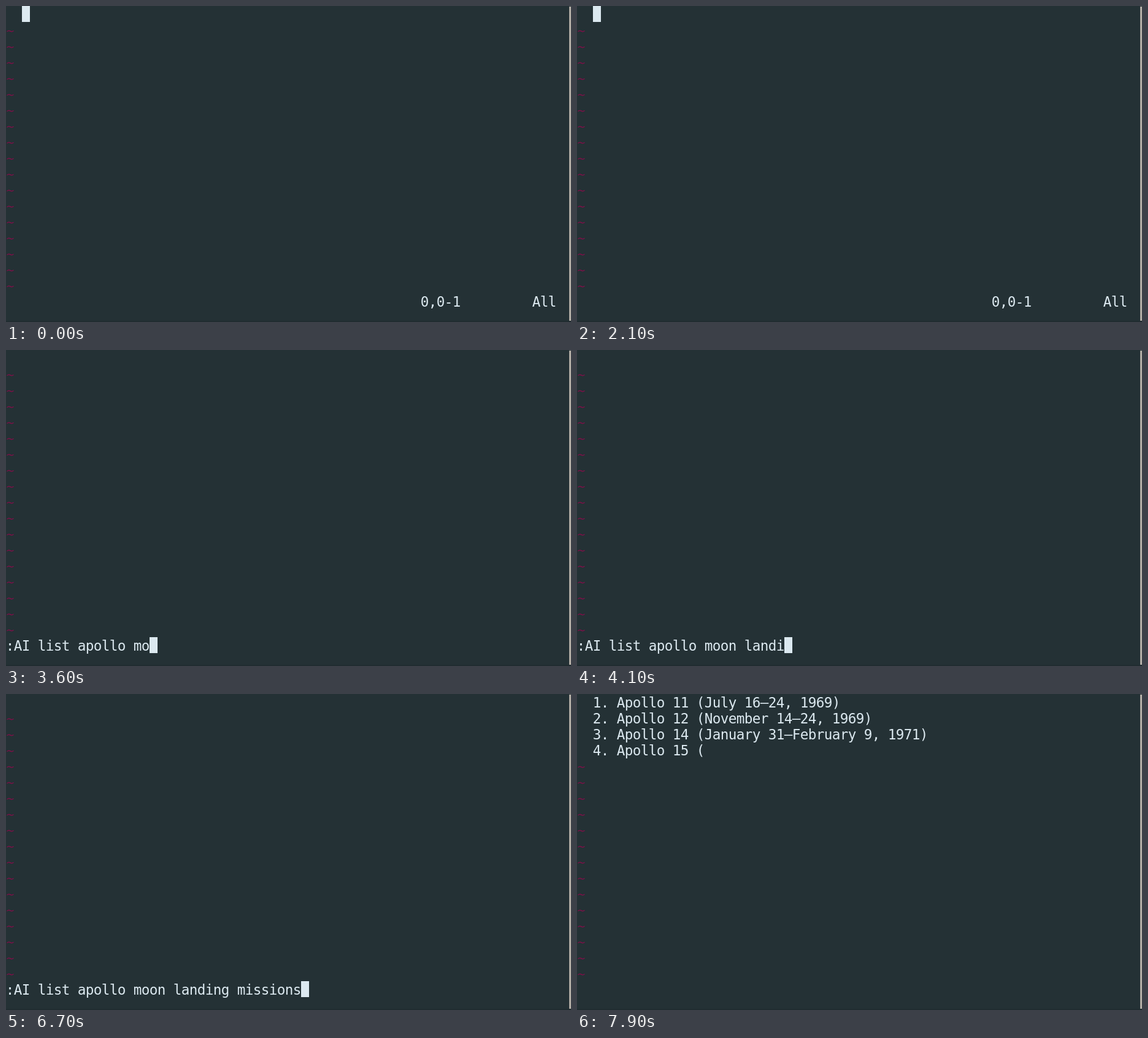
Animation of 921 by 515 pixels, one loop 8000 ms. Source, as an HTML page:

```html
<!DOCTYPE html>
<html lang="en">
<head>
<meta charset="utf-8">
<title>Editor session</title>
<style>
  html, body { margin: 0; width: 100%; height: 100%; overflow: hidden; background: #243135; }
  svg { display: block; width: 921px; height: 515px; }
  text { font: 22.6px "DejaVu Sans Mono", monospace; fill: #dce9f0; text-anchor: middle; }
  .tilde { fill: none; stroke: #7c1148; stroke-width: 1.5; }
</style>
</head>
<body>
<svg id="screen" viewBox="0 0 921 515">
  <rect width="921" height="515" fill="#243135"/>
  <rect y="513" width="921" height="2" fill="#202c30"/>
  <rect x="918" y="1" width="3" height="512" fill="#b3aea6"/>
</svg>
<script>
const CELL = 13, ROW = 26, LOOP = 8000, LAST = 18;
const command = ':AI list apollo moon landing missions';
const reply = [
  '1. Apollo 11 (July 16–24, 1969)',
  '2. Apollo 12 (November 14–24, 1969)',
  '3. Apollo 14 (January 31–February 9, 1971)',
  '4. Apollo 15 ('
];
// [time, characters typed]
const typing = [[2900, 1], [3600, 18], [3700, 20], [4100, 26], [4600, 37]];
// [time, cursor visible]
const blinks = [[0, 1], [300, 0], [900, 1], [1500, 0], [2100, 1], [2700, 0],
  [2900, 1], [5200, 0], [5800, 1], [6400, 0], [6700, 1], [7000, 0]];

const screen = document.getElementById('screen');

function add(tag, attrs) {
  const el = document.createElementNS('http://www.w3.org/2000/svg', tag);
  for (const key in attrs) el.setAttribute(key, attrs[key]);
  return screen.appendChild(el);
}

// One glyph per terminal cell.
function addText(str, col, row) {
  const x = [...str].map((_, i) => (col + i + 0.5) * CELL).join(' ');
  const el = add('text', { x, y: row * ROW + 22 });
  el.textContent = str;
  return el;
}

function setText(el, str) {
  if (el.textContent !== str) el.textContent = str;
}

function show(el, on) {
  el.style.visibility = on ? 'visible' : 'hidden';
}

function typedCount(t) {
  for (let i = 1; i < typing.length; i++) {
    const [t0, n0] = typing[i - 1], [t1, n1] = typing[i];
    if (t < t1) return Math.round(n0 + (n1 - n0) * (t - t0) / (t1 - t0));
  }
  return command.length;
}

const tildes = [];
for (let row = 1; row < LAST; row++) {
  const y = row * ROW + 15;
  tildes[row] = add('path', { class: 'tilde', d: `M1.5 ${y + 0.8}q2.8-2.4 5.5-.8t5.5-.8` });
}
const ruler = [addText('0,0-1', 52, LAST), addText('All', 66, LAST)];
const prompt = addText(command, 0, LAST);
const lines = reply.map((str, row) => addText(str, 2, row));
const cursor = add('rect', { width: CELL, height: ROW, fill: '#dce9f0' });

function render(time) {
  const t = Math.floor(time % LOOP / 100) * 100;
  const idle = t < 2900, replying = t >= 7000;
  const typed = idle || replying ? 0 : typedCount(t);

  ruler.forEach(el => show(el, idle));
  setText(prompt, command.slice(0, typed));
  cursor.setAttribute('x', idle ? 2 * CELL : typed * CELL);
  cursor.setAttribute('y', idle ? 0 : LAST * ROW);
  show(cursor, blinks.filter(b => b[0] <= t).pop()[1]);

  let left = replying ? Math.round((t - 6900) / 900 * 111) : 0;
  lines.forEach((el, row) => {
    setText(el, reply[row].slice(0, Math.max(0, left)));
    if (row) show(tildes[row], left <= 0);
    left -= reply[row].length;
  });
}

const start = performance.now();
function tick() {
  render(performance.now() - start);
  requestAnimationFrame(tick);
}
tick();
</script>
</body>
</html>
```
